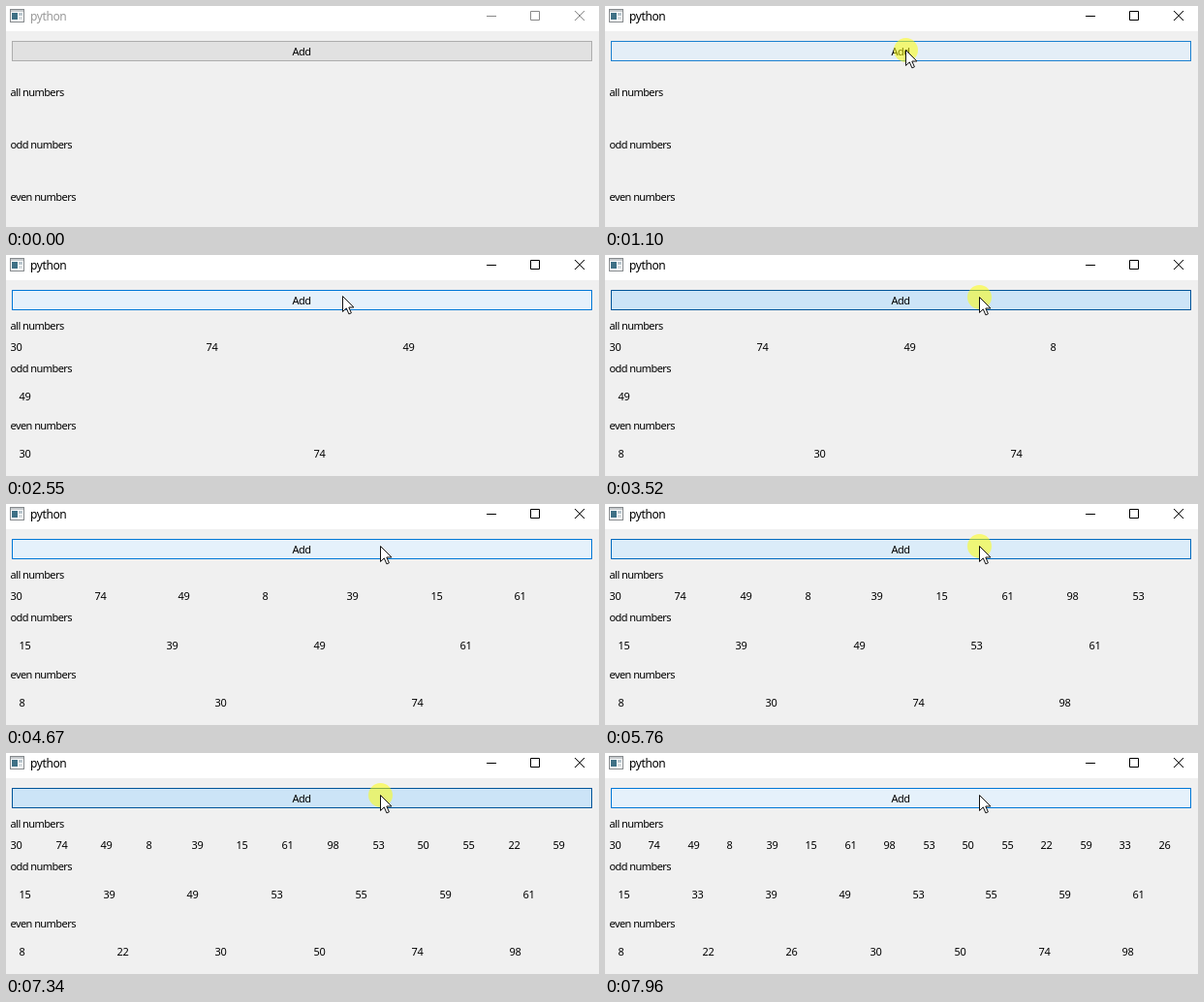
Write an HTML page that moves like this. It is 612 px wide and 228 px high and loops after 8000 ms.

```html
<!DOCTYPE html>
<html lang="en">
<head>
<meta charset="utf-8">
<title>python</title>
<style>
  html, body { margin: 0; width: 100%; height: 100%; overflow: hidden; background: #f0f0f0; }
  svg { display: block; width: 612px; height: 228px; }
  text { font: 11px "Noto Sans", "Open Sans", sans-serif; letter-spacing: -.56px; white-space: pre; }
  .num { letter-spacing: -.3px; }
  #title { font-size: 12px; letter-spacing: -.4px; }
</style>
</head>
<body>
<svg viewBox="0 0 612 228">
  <rect width="612" height="228" fill="#f0f0f0"/>
  <rect width="612" height="26" fill="#fff"/>

  <g id="icon">
    <rect x="4.5" y="3.5" width="14" height="13" fill="#fff" stroke="#85898c"/>
    <rect x="5" y="4" width="13" height="2" fill="#c5c9cc"/>
    <rect x="6" y="7" width="6" height="7" fill="#3f7186"/>
    <rect x="13" y="7" width="4" height="3" fill="#b9c6cd"/>
    <rect x="13" y="11" width="4" height="3" fill="#d8dde0"/>
  </g>
  <text id="title" x="25" y="15">python</text>
  <path id="controls" fill="none" d="M496 10.5h10M541.5 5.5h9v9h-9zM587 5l10 10M597 5l-10 10"/>

  <rect id="button" x="6.5" y="36.5" width="598" height="20"/>
  <text x="295.5" y="51">Add</text>
  <g id="rows"></g>

  <circle id="halo" r="12.5" fill="#ff0" fill-opacity=".52"/>
  <path id="cursor" d="M.5 .5v16l3.8-3.6 2.6 6 2.5-1.1-2.6-5.8h5.1z" fill="#fff" stroke="#111" stroke-width="1"/>
</svg>

<script>
const LOOP = 8000;
const VALUES = [30, 74, 49, 8, 39, 15, 61, 98, 53, 50, 55, 22, 59, 33, 26];
// press and release time of each click
const CLICKS = [
  [1100, 1240], [1650, 1790], [2260, 2370], [2900, 3010], [3400, 3530],
  [3920, 4050], [4350, 4480], [4800, 4900], [5280, 5400], [5760, 5860],
  [6190, 6310], [6430, 6535], [6860, 6980], [7240, 7360], [7610, 7730]
];
// time, x, y of the pointer tip
const PATH = [
  [550, 322, 226], [1060, 310, 45], [2440, 310, 45],
  [2550, 347, 42], [2665, 386, 43], [LOOP, 386, 43]
];
const HOVER = [1000, 1120];
const IDLE = { fill: [225, 225, 225], line: [173, 173, 173] };
const HOT = { fill: [229, 241, 251], line: [0, 120, 215] };
const DOWN = { fill: [204, 228, 247], line: [0, 84, 153] };

const el = id => document.getElementById(id);
const [title, controls, button, rows, halo, cursor] =
  ["title", "controls", "button", "rows", "halo", "cursor"].map(el);
const ramp = (t, a, b) => Math.min(1, Math.max(0, (t - a) / (b - a)));
const mix = (a, b, k) => a.map((v, i) => v + (b[i] - v) * k);
const rgb = c => `rgb(${c.map(Math.round)})`;
const show = (node, on) => node.setAttribute("visibility", on ? "visible" : "hidden");

function addText(content, x, y, name) {
  const node = document.createElementNS("http://www.w3.org/2000/svg", "text");
  node.textContent = content;
  node.setAttribute("x", x);
  node.setAttribute("y", y);
  if (name) node.setAttribute("class", name);
  rows.append(node);
}

// Vertical box layout: lists keep their height, the other rows share the rest.
function layout(count) {
  const all = VALUES.slice(0, count);
  const pick = rest => all.filter(v => v % 2 === rest).sort((a, b) => a - b);
  const items = [
    { label: "all numbers" }, { list: all, x: 4.5 },
    { label: "odd numbers" }, { list: pick(1), x: 13.5, height: 31 },
    { label: "even numbers" }, { list: pick(0), x: 13.5, height: 31 }
  ].filter(item => item.label || item.list.length);
  const gap = 6;
  const fixed = items.filter(item => item.height);
  const free = 156 - gap * (items.length - 1) - 31 * fixed.length;
  const share = free / (items.length - fixed.length);

  rows.replaceChildren();
  let top = 65;
  for (const { label, list, x, height = share } of items) {
    const base = Math.floor(top + height / 2) + 4;
    if (label) addText(label, 4.5, base);
    else list.forEach((v, i) => addText(v, x + Math.round(i * 607 / list.length), base, "num"));
    top += height + gap;
  }
}

function pointer(t) {
  const i = Math.max(1, PATH.findIndex(p => p[0] >= t));
  const [a, b] = [PATH[i - 1], PATH[i]];
  return mix(a.slice(1), b.slice(1), ramp(t, a[0], b[0]));
}

function pressure(t) {
  return Math.max(...CLICKS.map(([down, up]) => {
    const start = Math.max(HOVER[1], down - 60);
    return ramp(t, start, start + 150) * (1 - ramp(t, up, up + 180));
  }));
}

let shown = -1;
function draw(t) {
  const count = CLICKS.filter(c => t >= c[1]).length;
  if (count !== shown) layout(shown = count);

  const active = t >= CLICKS[0][0];
  title.setAttribute("fill", active ? "#000" : "#999");
  controls.setAttribute("stroke", active ? "#000" : "#888");

  const hover = ramp(t, ...HOVER), press = pressure(t);
  const tone = key => rgb(mix(mix(IDLE[key], HOT[key], hover), DOWN[key], press));
  button.setAttribute("fill", tone("fill"));
  button.setAttribute("stroke", tone("line"));

  const [x, y] = pointer(t).map(Math.round);
  cursor.setAttribute("transform", `translate(${x} ${y})`);
  halo.setAttribute("cx", x + .5);
  halo.setAttribute("cy", y + .5);
  show(cursor, t >= PATH[0][0]);
  show(halo, CLICKS.some(([down, up]) => t >= down && t < up));
}

const begin = performance.now();
function tick() {
  draw((performance.now() - begin) % LOOP);
  requestAnimationFrame(tick);
}
tick();
</script>
</body>
</html>
```
